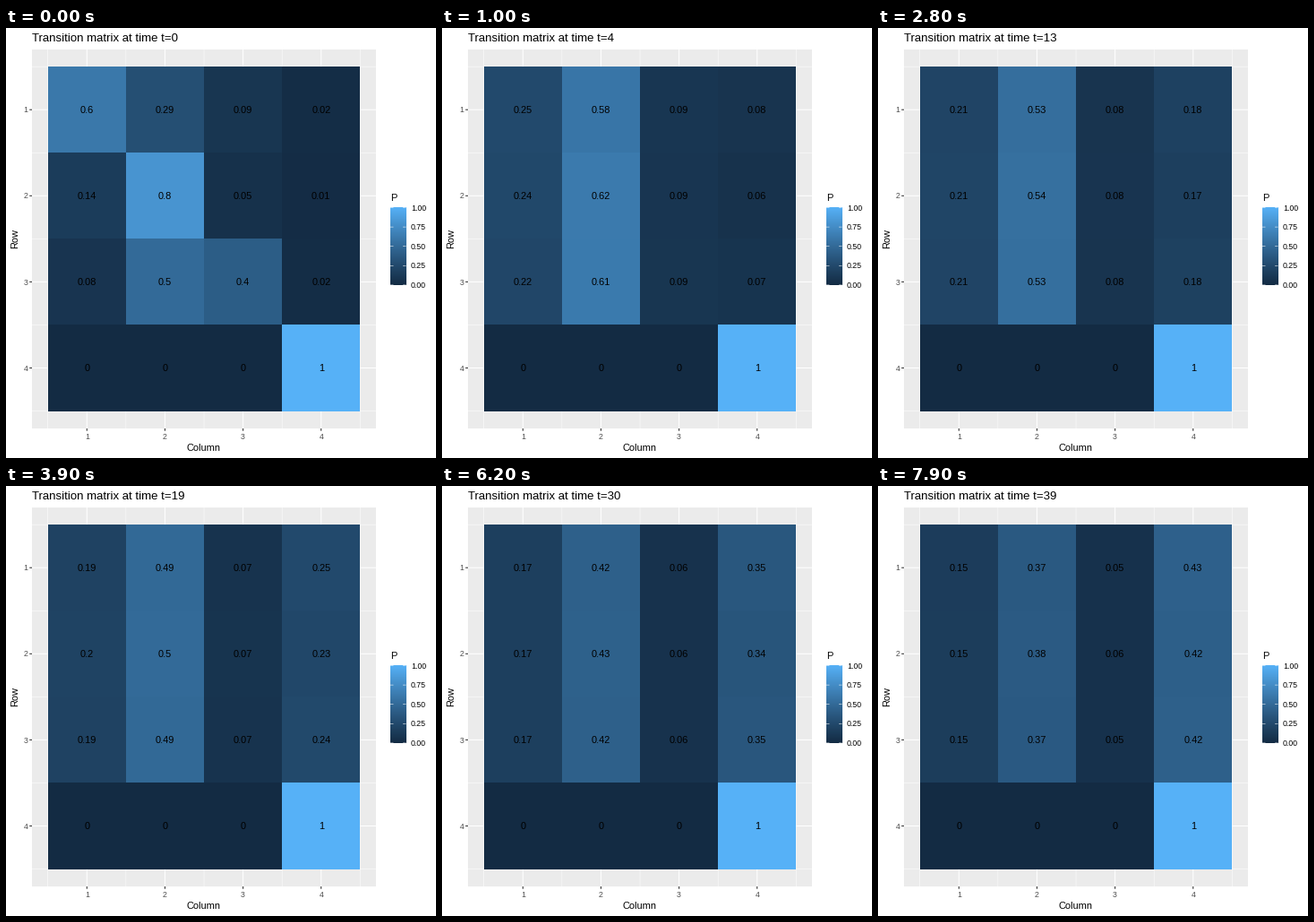
Recreate the animation shown at these times as a matplotlib script. Size 480x480 px, loop 8 s.

```python
import numpy as np
import matplotlib as mpl
import matplotlib.pyplot as plt
from matplotlib.animation import FuncAnimation
from matplotlib.patches import Rectangle

mpl.rcParams["font.family"] = "Liberation Sans"
mpl.rcParams["text.hinting"] = "auto"

SIZE = 480
FRAMES = 80
INTERVAL = 100
STEPS_PER_FRAME = 49 / 99

P = np.array([
    [0.60, 0.29, 0.09, 0.02],
    [0.14, 0.80, 0.05, 0.01],
    [0.08, 0.50, 0.40, 0.02],
    [0.00, 0.00, 0.00, 1.00],
])

LEFT, RIGHT, TOP, BOTTOM = 29, 413, 24, 447
X_EDGES = [47, 134, 221, 308, 395]
Y_EDGES = [43, 139, 235, 331, 428]
X_MID = [90.3 + 87.15 * i for i in range(4)]
Y_MID = [91.2 + 96.1 * i for i in range(4)]

BAR_LEFT, BAR_RIGHT, BAR_TOP, BAR_BOTTOM = 429, 446.5, 200.5, 286.9

# Colour ramp, linear in CIE Lab between two blues
RGB_XYZ = np.array([
    [0.4124564, 0.3575761, 0.1804375],
    [0.2126729, 0.7151522, 0.0721750],
    [0.0193339, 0.1191920, 0.9503041],
])
WHITE = RGB_XYZ.sum(axis=1)


def to_lab(color):
    rgb = np.array(mpl.colors.to_rgb(color))
    lin = np.where(rgb > 0.04045, ((rgb + 0.055) / 1.055) ** 2.4, rgb / 12.92)
    q = RGB_XYZ @ lin / WHITE
    f = np.where(q > 0.008856, np.cbrt(q), 7.787 * q + 16 / 116)
    return np.array([116 * f[1] - 16, 500 * (f[0] - f[1]), 200 * (f[1] - f[2])])


def from_lab(lab):
    fy = (lab[0] + 16) / 116
    f = np.array([fy + lab[1] / 500, fy, fy - lab[2] / 200])
    q = np.where(f > 0.206893, f ** 3, (f - 16 / 116) / 7.787)
    lin = np.clip(np.linalg.solve(RGB_XYZ, q * WHITE), 0, 1)
    rgb = np.where(lin > 0.0031308, 1.055 * lin ** (1 / 2.4) - 0.055, 12.92 * lin)
    return np.clip(rgb, 0, 1)


LOW, HIGH = to_lab("#132B43"), to_lab("#56B1F7")


def shade(p):
    return from_lab(LOW + (HIGH - LOW) * p)


fig = plt.figure(figsize=(SIZE / 72, SIZE / 72), dpi=72, facecolor="white")
ax = fig.add_axes([0, 0, 1, 1])


def rect(x0, y0, x1, y1, color, z):
    patch = Rectangle((x0, y0), x1 - x0, y1 - y0, facecolor=color,
                      linewidth=0, antialiased=False, zorder=z)
    return ax.add_patch(patch)


def line(x0, y0, x1, y1, color, width, z):
    ax.plot([x0, x1], [y0, y1], color=color, lw=width, zorder=z,
            solid_capstyle="butt", snap=False)


def text(x, y, s, size, color="black", ha="left", **kw):
    return ax.text(x, y, s, fontsize=size, color=color, ha=ha,
                   va="baseline", zorder=6, **kw)


def draw_panel():
    rect(LEFT, TOP, RIGHT, BOTTOM, "#EBEBEB", 1)
    minor_x = [x - 43.57 for x in X_MID] + [X_MID[-1] + 43.57]
    minor_y = [y - 48.05 for y in Y_MID] + [Y_MID[-1] + 48.05]
    for xs, ys, width in ((minor_x, minor_y, 0.53), (X_MID, Y_MID, 1.07)):
        for x in xs:
            line(x, TOP, x, BOTTOM, "white", width, 2)
        for y in ys:
            line(LEFT, y, RIGHT, y, "white", width, 2)
    for i, (x, y) in enumerate(zip(X_MID, Y_MID), 1):
        line(x, BOTTOM, x, BOTTOM + 2.75, "#333333", 1.07, 3)
        line(LEFT - 2.75, y, LEFT, y, "#333333", 1.07, 3)
        text(x, 459, str(i), 8.8, "#4D4D4D", "center")
        text(24.2, y + 3.2, str(i), 8.8, "#4D4D4D", "right")
    text(221, 472, "Column", 11, ha="center")
    text(13, 235.3, "Row", 11, ha="center", rotation=90, rotation_mode="anchor")


def draw_legend():
    ramp = np.array([[shade(p)] for p in np.linspace(1, 0, 300)])
    ax.imshow(ramp, extent=[BAR_LEFT, BAR_RIGHT, BAR_BOTTOM, BAR_TOP],
              aspect="auto", interpolation="bilinear", zorder=4)
    for p in np.linspace(0, 1, 5):
        y = BAR_BOTTOM + (BAR_TOP - BAR_BOTTOM) * p
        line(BAR_LEFT, y, BAR_LEFT + 3.46, y, "white", 0.53, 5)
        line(BAR_RIGHT - 3.46, y, BAR_RIGHT, y, "white", 0.53, 5)
        text(452, y + 3.2, f"{p:.2f}", 8.8)
    text(429, 193, "P", 11)


draw_panel()
draw_legend()
title = text(29, 15, "", 13.2)
tiles, labels = [], []
for r in range(4):
    for c in range(4):
        tiles.append(rect(X_EDGES[c], Y_EDGES[r], X_EDGES[c + 1], Y_EDGES[r + 1],
                          "white", 4))
        labels.append(text(X_MID[c], Y_MID[r] + 3.9, "", 11.04, ha="center"))

ax.set_xlim(0, SIZE)
ax.set_ylim(SIZE, 0)
ax.axis("off")


def update(frame):
    t = int(frame * STEPS_PER_FRAME)
    title.set_text(f"Transition matrix at time t={t}")
    probs = np.linalg.matrix_power(P, t + 1).ravel()
    for tile, label, p in zip(tiles, labels, probs):
        tile.set_facecolor(shade(p))
        label.set_text(f"{round(p, 2):g}")
    return [title, *tiles, *labels]


anim = FuncAnimation(fig, update, frames=FRAMES, interval=INTERVAL,
                     repeat=True, repeat_delay=0, blit=False)
plt.show()
```
